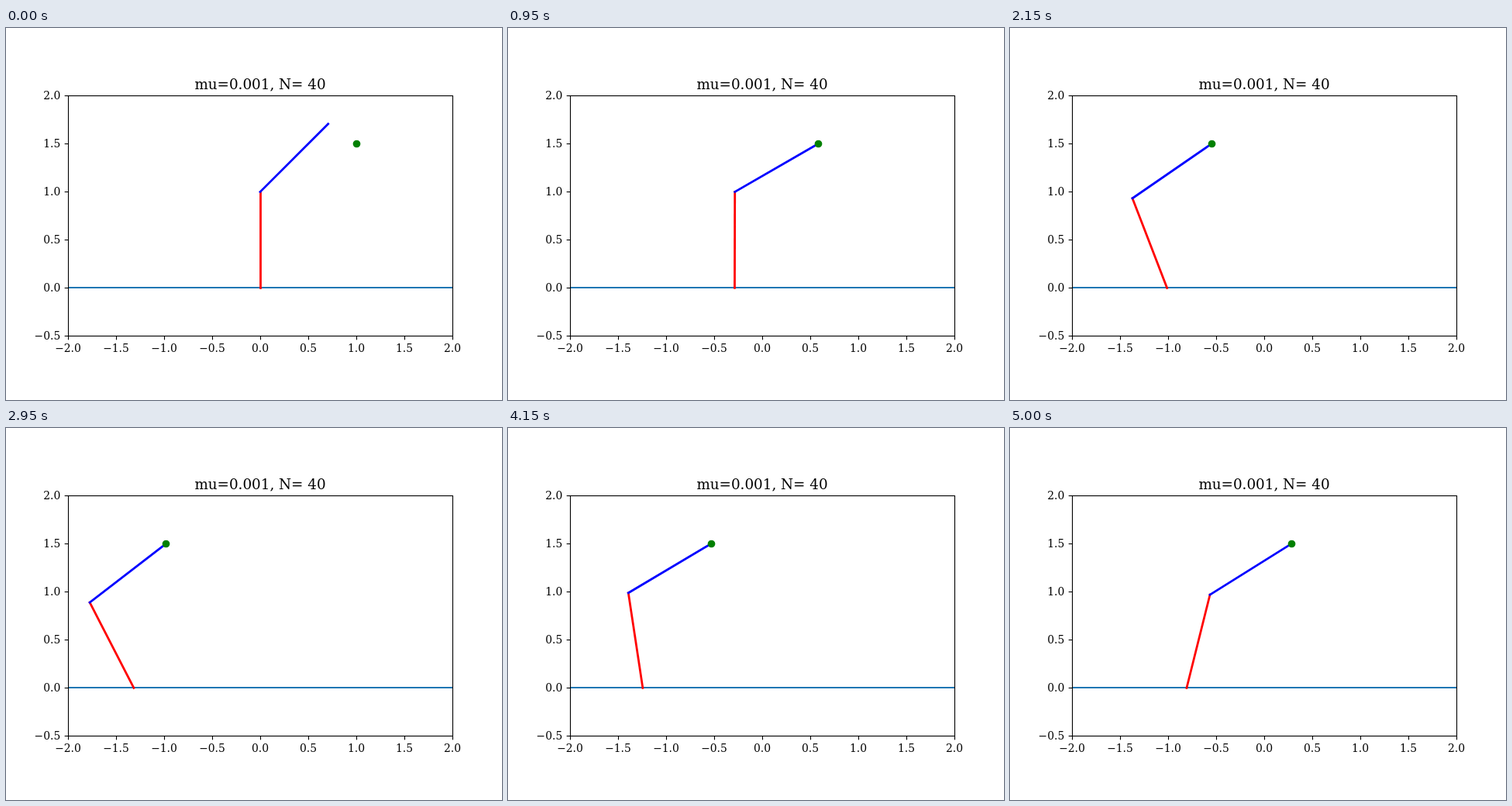
Write an HTML page that moves like this. It is 640 px wide and 480 px high and loops after 5050 ms.

```html
<!DOCTYPE html>
<html lang="en">
<head>
<meta charset="utf-8">
<title>Two-link arm</title>
<style>
  html, body { margin: 0; width: 100%; height: 100%; overflow: hidden; background: #fff; }
  svg { display: block; width: 640px; height: 480px; }
  text { font: 13.89px "DejaVu Serif", "Noto Serif", serif; }
  .title { font-size: 18.33px; text-anchor: middle; }
  .link { stroke-width: 2.78; stroke-linecap: square; }
</style>
</head>
<body>
<svg viewBox="0 0 640 480">
  <line x1="80" x2="576" y1="335" y2="335" stroke="#1f77b4" stroke-width="2.08"/>
  <line id="lower" class="link" stroke="#f00"/>
  <line id="upper" class="link" stroke="#00f"/>
  <circle id="goal" cy="149.5" r="4.86" fill="#008000"/>
  <g id="axes" stroke="#000" stroke-width="1.11" fill="none">
    <rect x="80.5" y="87.5" width="496" height="310"/>
  </g>
  <g id="labels">
    <text class="title" x="328" y="79">mu=0.001, N= 40</text>
  </g>
</svg>
<script>
const UNIT = 124, STEP = 50, STEPS = 101;
const $ = id => document.getElementById(id);
const px = x => 328 + UNIT * x;
const py = y => 335.4 - UNIT * y;

function add(parent, tag, attrs, text = "") {
  const node = document.createElementNS("http://www.w3.org/2000/svg", tag);
  setAttrs(node, attrs);
  node.textContent = text;
  $(parent).append(node);
}

function setAttrs(node, attrs) {
  for (const key in attrs) node.setAttribute(key, attrs[key]);
}

const label = v => v.toFixed(1).replace("-", "\u2212");

for (let v = -2; v <= 2; v += 0.5) {
  const x = px(v);
  add("axes", "path", { d: `M${x + 0.5} 397.5v4.86` });
  add("labels", "text", { x, y: 418, "text-anchor": "middle" }, label(v));
}
for (let v = -0.5; v <= 2; v += 0.5) {
  const y = Math.round(py(v));
  add("axes", "path", { d: `M80.5 ${y + 0.5}h-4.86` });
  add("labels", "text", { x: 70.3, y: y + 5, "text-anchor": "end" }, label(v));
}

// Angle of the lower link every half second, with one guard value at each end.
const ANGLES = [1.482, 1.447, 1.482, 1.581, 1.7337, 1.8976, 2.0158,
  2.0445, 1.961, 1.785, 1.5586, 1.326, 1.12];

function lowerAngle(t) {
  const i = Math.min(Math.floor(t * 2), ANGLES.length - 4);
  const u = t * 2 - i;
  const [a, b, c, d] = ANGLES.slice(i, i + 4);
  return b + u / 2 * (c - a + u * (2 * a - 5 * b + 4 * c - d + u * (3 * (b - c) + d - a)));
}

function setLine(id, x1, y1, x2, y2) {
  setAttrs($(id), { x1, y1, x2, y2 });
}

function draw(step) {
  const t = step * STEP / 1000;
  const goalX = Math.cos(t);
  setAttrs($("goal"), { cx: Math.round(px(goalX)) + 0.5 });

  if (step === 0) {
    setLine("lower", 328.5, 335.5, 328.5, 211.5);
    setLine("upper", px(0), py(1), px(Math.SQRT1_2), py(1 + Math.SQRT1_2));
    return;
  }
  // The tip stays on the goal; the base follows from both link angles.
  const a = lowerAngle(t);
  const c = Math.asin(1.5 - Math.sin(a));
  const jointX = goalX - Math.cos(c);
  const jointY = Math.sin(a);
  setLine("lower", px(jointX - Math.cos(a)), py(0), px(jointX), py(jointY));
  setLine("upper", px(jointX), py(jointY), px(goalX), py(1.5));
}

const start = performance.now();
function tick() {
  draw(Math.floor((performance.now() - start) / STEP) % STEPS);
  requestAnimationFrame(tick);
}
draw(0);
requestAnimationFrame(tick);
</script>
</body>
</html>
```
